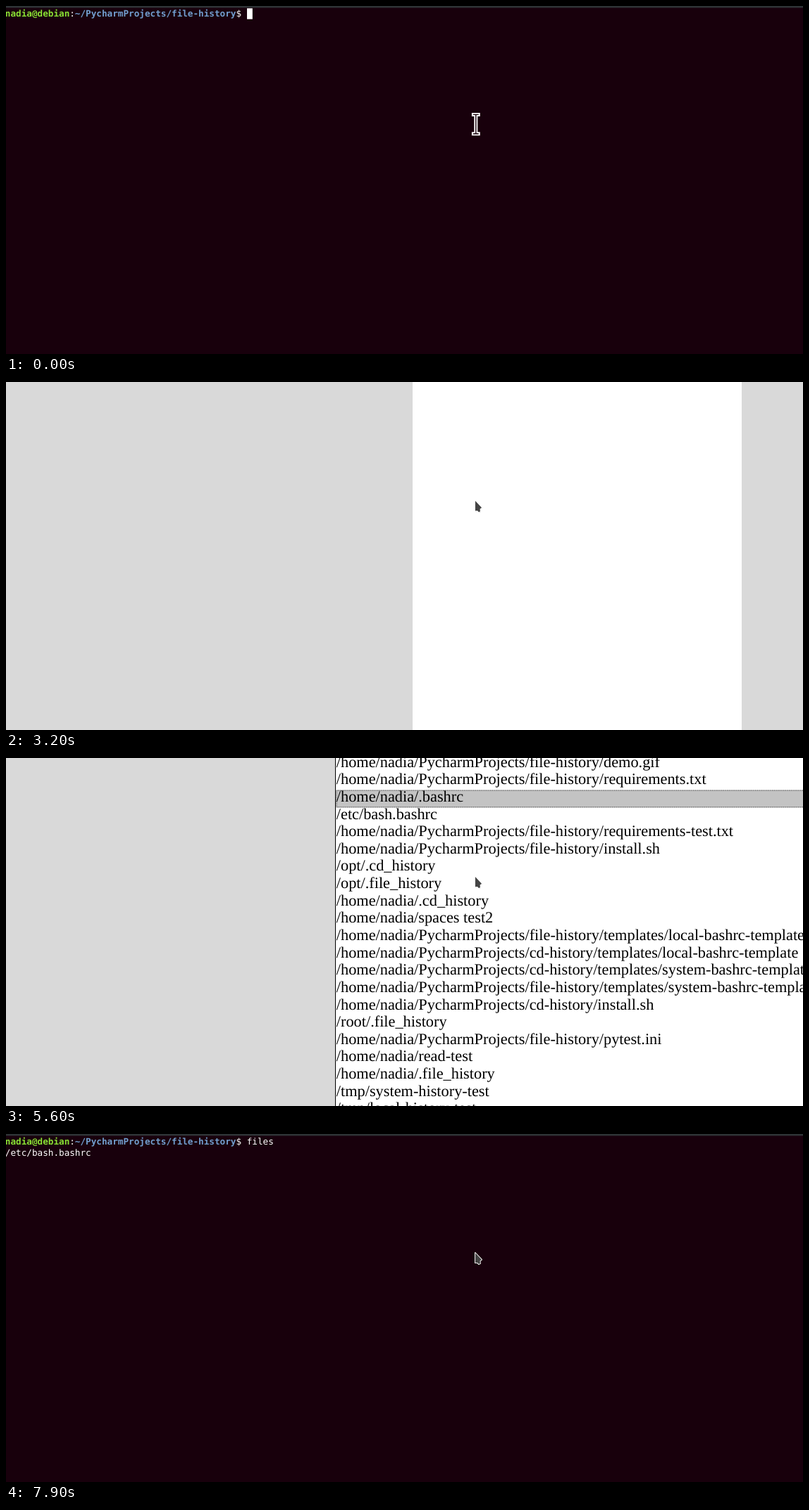
An HTML page for the animation above (8000 ms loop, 1131x495 px).

```html
<!DOCTYPE html>
<html lang="en">
<head>
<meta charset="utf-8">
<title>File history</title>
<style>
  html, body { margin: 0; width: 100%; height: 100%; overflow: hidden; background: #18000c; }
  svg { display: block; width: 1131px; height: 495px; }
  text { white-space: pre; text-rendering: geometricPrecision; }
  #term { font: 12.667px "DejaVu Sans Mono", monospace; fill: #fff; }
  #list { font: 22.32px "Liberation Serif", "Times New Roman", serif; fill: #000; }
  .user { fill: #8ae234; font-weight: bold; }
  .dir { fill: #729fcf; font-weight: bold; }
</style>
</head>
<body>
<svg viewBox="0 0 1131 495">
  <g id="term">
    <rect width="1131" height="495" fill="#18000c"/>
    <rect width="1131" height="2.5" fill="#2e3436"/>
    <text x="-1.2" y="15.2"><tspan class="user">nadia@debian</tspan>:<tspan class="dir">~/PycharmProjects/file-history</tspan>$ <tspan id="typed"></tspan></text>
    <text id="output" x="-1.2" y="30.6">/etc/bash.bashrc</text>
    <rect id="caret" width="7.8" height="15.4"/>
  </g>
  <g id="win">
    <rect width="1131" height="495" fill="#d9d9d9"/>
    <rect id="blank" x="577" width="467" height="495" fill="#fff"/>
    <g id="list">
      <rect x="467" width="664" height="495" fill="#fff"/>
      <rect x="467" width="1" height="495"/>
      <g id="pick">
        <rect x="468.5" width="664" height="24.64" fill="#c3c3c3"/>
        <path d="M1131 .4H469V24.25H1131" fill="none" stroke="#000" stroke-width=".8" stroke-dasharray=".8 .8"/>
      </g>
      <g id="rows"></g>
    </g>
  </g>
  <g id="beam" fill="none" stroke-linecap="square">
    <path d="M663.4 154.4H670.2M663.4 181.8H670.2M666.8 154.4V181.8" stroke="#fff" stroke-width="5"/>
    <path d="M663.6 154.4H670M663.6 181.8H670M666.8 154.4V181.8" stroke="#18000c" stroke-width="1.4"/>
  </g>
  <g id="arrow" stroke-linejoin="round">
    <path d="M666.2 170.2L676 179.8L673 181.8L673.4 185.4L671.2 186.2L669.4 184.4L666.2 184.6Z" fill="#000" opacity=".14"/>
    <path d="M665.9 169L675 178.7L672.6 180.6L672.9 184.2L670.8 185.1L669 183.1L665.9 183.2Z" fill="#444" stroke="#fff" stroke-width="1.8" paint-order="stroke"/>
  </g>
</svg>
<script>
const LOOP = 8000, ROW = 24.64, LINE = 15.4, CHAR = 7.626;
const $ = id => document.getElementById(id);
const show = (id, on) => $(id).setAttribute("display", on ? "inline" : "none");

const home = "/home/nadia/";
const proj = home + "PycharmProjects/";
const fh = proj + "file-history/", cd = proj + "cd-history/";
const files = [
  fh + "demo.gif", fh + "requirements.txt", home + ".bashrc", "/etc/bash.bashrc",
  fh + "requirements-test.txt", fh + "install.sh", "/opt/.cd_history", "/opt/.file_history",
  home + ".cd_history", home + "spaces test2", fh + "templates/local-bashrc-template",
  cd + "templates/local-bashrc-template", cd + "templates/system-bashrc-template",
  fh + "templates/system-bashrc-template", cd + "install.sh", "/root/.file_history",
  fh + "pytest.ini", home + "read-test", home + ".file_history",
  "/tmp/system-history-test", "/tmp/local-history-test"
];
files.forEach((name, i) => {
  const row = document.createElementNS("http://www.w3.org/2000/svg", "text");
  row.setAttribute("x", 468.8);
  row.setAttribute("y", 12.6 + i * ROW);
  row.textContent = name;
  $("rows").append(row);
});

function render(t) {
  const within = (a, b) => t >= a && t < b;
  const open = within(3200, 7200);
  const count = Math.max(0, Math.min(5, Math.floor((t - 1100) / 100)));
  const line = t < 2700 ? 0 : t < 7200 ? 1 : 2;

  $("typed").textContent = "files".slice(0, count);
  show("output", t >= 7200);
  show("caret", !(within(500, 1100) || within(2200, 2700) || t >= 7800));
  $("caret").setAttribute("x", line ? -1.4 : 342 + count * CHAR);
  $("caret").setAttribute("y", 3.3 + line * LINE);

  show("win", open);
  show("blank", t < 3400);
  show("list", t >= 3400);
  const pick = [4400, 5600, 6400].filter(s => t >= s).length;
  $("pick").setAttribute("transform", `translate(0 ${-3.6 + pick * ROW})`);

  show("beam", t < 1200 || within(7200, 7900));
  show("arrow", open || t >= 7900);
}

const start = performance.now();
function tick() {
  render((performance.now() - start) % LOOP);
  requestAnimationFrame(tick);
}
tick();
</script>
</body>
</html>
```
